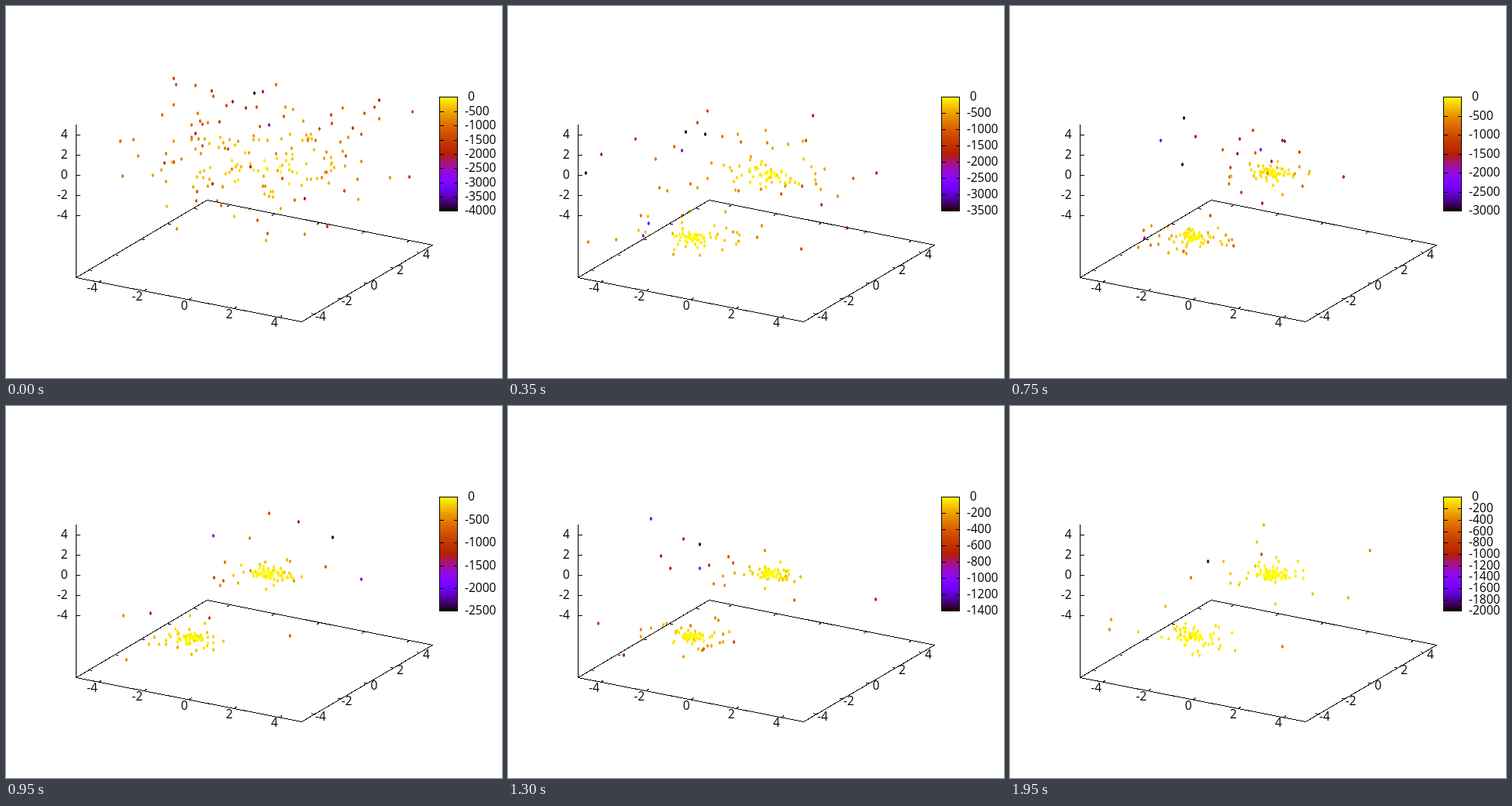
Write an HTML page that moves like this. It is 640 by 480 pixels and loops after 2 s.

```html
<!DOCTYPE html>
<html lang="en">
<head>
<meta charset="utf-8">
<title>Two converging clusters</title>
<style>
  html, body { margin: 0; width: 100%; height: 100%; overflow: hidden; background: #fff; }
  svg { display: block; width: 640px; height: 480px; }
  text { font: 15.5px "Open Sans", "Noto Sans", sans-serif; white-space: pre; }
  .line { fill: none; stroke: #000; shape-rendering: crispEdges; }
  #dots { shape-rendering: crispEdges; }
</style>
</head>
<body>
<svg viewBox="0 0 640 480">
  <defs><linearGradient id="palette" x1="0" y1="1" x2="0" y2="0"></linearGradient></defs>
  <g id="dots"></g>
  <path id="axes" class="line"/>
  <g id="axisLabels"></g>
  <rect x="559.5" y="117.5" width="23" height="147" fill="url(#palette)"/>
  <rect x="559.5" y="117.5" width="23" height="147" class="line"/>
  <path id="barTicks" class="line"/>
  <g id="barLabels"></g>
</svg>
<script>
const FRAME_MS = 50, FRAMES = 40, COUNT = 180, LIFE = 2;
const BAR = { left: 559.5, right: 582.5, top: 117.5, height: 147 };
const CENTERS = [[0.65, 0, -1.18], [0, -4.85, -4.1]];
const STRETCH = [1, 0.7, 0.5];
// [frame, depth of the colour scale]
const DEPTHS = [[0, 4000], [7, 3500], [15, 3000], [19, 2500], [26, 1400], [32, 2000], [39, 2000]];
const DOT = "M-1-1h1v-1h1v1h1v3h-1v1h-1v-1h-1z";

const byId = id => document.getElementById(id);

function add(parent, tag, attrs, content = "") {
  const node = document.createElementNS("http://www.w3.org/2000/svg", tag);
  for (const key in attrs) node.setAttribute(key, attrs[key]);
  node.textContent = content;
  parent.append(node);
  return node;
}

function color(level) {
  const rgb = [Math.sqrt(level), level ** 3, Math.max(0, Math.sin(2 * Math.PI * level))];
  return `rgb(${rgb.map(c => Math.round(c * 255))})`;
}

// Oblique view of the cube from -5 to 5
const project = ([x, y, z]) => [
  90 + 29.1 * (x + 5) + 16.9 * (y + 5),
  218 + 5.7 * (x + 5) - 9.9 * (y + 5) - 13 * z
];

const signed = n => n < 0 ? String(n) : " " + n;

function label(parent, x, y, value, anchor = "start") {
  add(parent, "text", { x, y, "text-anchor": anchor }, signed(value));
}

function drawAxes() {
  let d = "M90.5 152.5V350.5L381.5 407.5L550.5 308.5L259.5 250.5L90.5 350.5";
  const tick = (x, y, dx, dy) => d += `M${x + 0.5} ${y + 0.5}l${dx} ${dy}`;
  const labels = byId("axisLabels");
  for (let v = -4; v <= 4; v += 2) {
    const s = v + 5;
    const zY = 218 - 13 * v;
    tick(90, zY, 5, 0);
    label(labels, 79.5, zY + 5, v, "end");

    const xX = 90 + 29.1 * s, xY = 350 + 5.7 * s;
    tick(xX, xY, 4, -2.4);
    tick(xX + 169, xY - 99.5, -4, 2.4);
    label(labels, xX - 1, xY + 13, v, "end");

    const yX = 381 + 16.9 * s, yY = 407 - 9.9 * s;
    tick(yX, yY, -4, -0.8);
    tick(yX - 291, yY - 57, 4, 0.8);
    label(labels, yX + 1, yY + 8.5, v);
  }
  byId("axes").setAttribute("d", d);
}

function randomFrom(seed) {
  return () => {
    seed = (seed + 0x6D2B79F5) | 0;
    let t = Math.imul(seed ^ (seed >>> 15), 1 | seed);
    t ^= t + Math.imul(t ^ (t >>> 7), 61 | t);
    return ((t ^ (t >>> 14)) >>> 0) / 4294967296;
  };
}

const gauss = random =>
  Math.sqrt(-2 * Math.log(1 - random())) * Math.cos(2 * Math.PI * random());

// Scattered widely at first, then heavy-tailed around one of the two centres
function makeDot(index, frame) {
  const phase = index % LIFE;
  const born = Math.max(0, Math.floor((frame + phase) / LIFE) * LIFE - phase);
  const random = randomFrom(index * 7919 + born * 104729 + 17);
  const scattered = random() < 0.04 + Math.exp(-born / 3.5);
  const center = CENTERS[index % 2];
  const u = random();
  const spread = (0.15 + 0.6 * u + 2 * u ** 8) * (1 + 1.6 * Math.exp(-born / 6));
  const top = born ? 126 : 86;
  let point, x, y;
  do {
    point = center.map((c, k) =>
      scattered ? 2.4 * gauss(random) : c + spread * STRETCH[k] * gauss(random));
    [x, y] = project(point).map(Math.round);
  } while (x < 99 || x > 547 || y < top || y > (born ? 327 : 303));
  const distance = Math.min(...CENTERS.map(c => Math.hypot(...c.map((v, k) => v - point[k]))));
  return { x, y, cost: distance ** 1.4 * (0.5 + random() ** 3) };
}

function depthAt(frame) {
  const next = Math.max(1, DEPTHS.findIndex(([f]) => f >= frame));
  const [f0, d0] = DEPTHS[next - 1], [f1, d1] = DEPTHS[next];
  const depth = d0 + (d1 - d0) * (frame - f0) / (f1 - f0);
  const step = depth > 2000 ? 500 : 200;
  return { step, depth: Math.round(depth / step) * step };
}

function drawScale(frame) {
  const { depth, step } = depthAt(frame);
  const labels = byId("barLabels");
  labels.replaceChildren();
  let d = "";
  for (let v = 0; v <= depth; v += step) {
    const y = BAR.top + Math.ceil(BAR.height * v / depth);
    d += `M${BAR.left} ${y}h5M${BAR.right} ${y}h-5`;
    label(labels, 592, y + 4.5, v ? -v : 0);
  }
  byId("barTicks").setAttribute("d", d);
}

const dots = Array.from({ length: COUNT }, () => add(byId("dots"), "path", { d: DOT }));

function draw(frame) {
  const state = dots.map((_, i) => makeDot(i, frame));
  const worst = Math.max(...state.map(s => s.cost));
  state.forEach(({ x, y, cost }, i) => {
    dots[i].setAttribute("transform", `translate(${x} ${y})`);
    dots[i].setAttribute("fill", color(1 - 0.97 * cost / worst));
  });
  drawScale(frame);
}

for (let i = 0; i <= 64; i++)
  add(byId("palette"), "stop", { offset: i / 64, "stop-color": color(i / 64) });
drawAxes();

let shown = -1;
function tick() {
  const frame = Math.floor(performance.now() / FRAME_MS) % FRAMES;
  if (frame !== shown) draw(shown = frame);
  requestAnimationFrame(tick);
}
tick();
</script>
</body>
</html>
```
